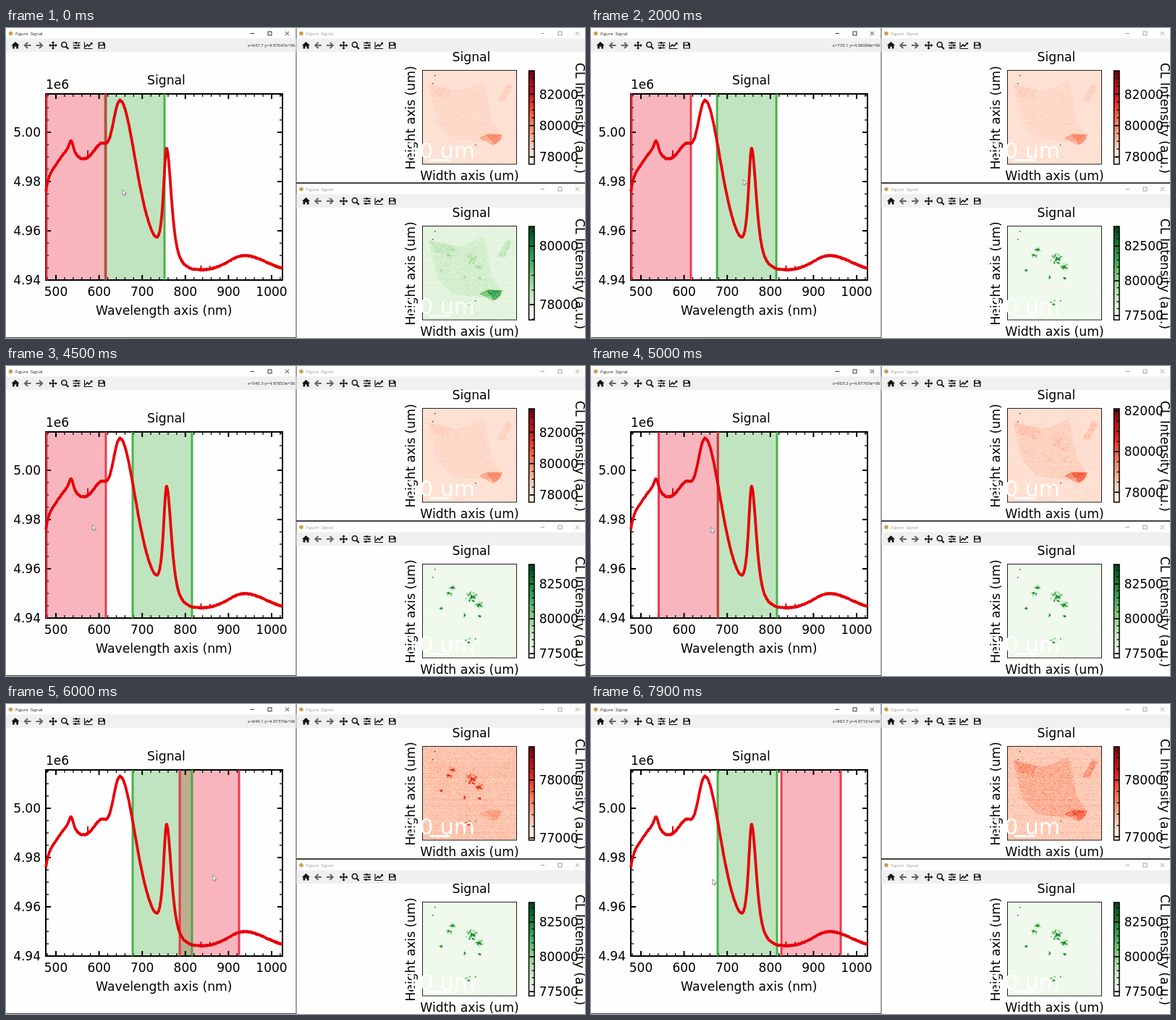
These frames come from a looping animation (800 by 428 pixels, 8000 ms). An HTML page with a canvas:

```html
<!DOCTYPE html>
<html lang="en">
<head>
<meta charset="utf-8">
<title>Spectrum explorer</title>
<style>
html, body { margin: 0; width: 100%; height: 100%; overflow: hidden; background: #fffefe; }
canvas { display: block; width: 800px; height: 428px; }
</style>
</head>
<body>
<canvas id="stage" width="800" height="428"></canvas>
<script>
const LOOP = 8000, STEP = 100, LAG = 400;
const ctx = document.getElementById('stage').getContext('2d');
const PLOT_FONT = '"DejaVu Sans", sans-serif', UI_FONT = '"Open Sans", sans-serif';
const AX = { l: 55, t: 91, r: 382, b: 348 };
const SPAN = 82, IMG_W = 130, IMG_H = 129;
const REDS = 'fff5f0 fee0d2 fcbba1 fc9272 fb6a4a ef3b2c cb181d a50f15 67000d';
const GREENS = 'f7fcf5 e5f5e0 c7e9c0 a1d99b 74c476 41ab5d 238b45 006d2c 00441b';

// Pointer turning points: time, x, y. Spans and readout follow it LAG ms later.
const POINTER = [
  [-400, 157, 224], [0, 161, 223], [600, 172, 210], [1700, 210, 209], [3000, 210, 209], [3600, 93, 217],
  [4100, 93, 217], [5100, 168, 223], [5800, 304, 236], [6700, 159, 239], [7450, 304, 240.5], [7950, 164, 242]
];
// Map look by span position: x, base, flake, patch, spots, noise, low, high
const LOOKS = [
  [55, .12, .03, .27, 0, .025, 77540, 83500],
  [134, .13, .07, .5, .15, .05, 77480, 80620],
  [174, .05, 0, 0, .7, .015, 77190, 83900],
  [239, .22, .01, .12, .45, .09, 76960, 78575],
  [262, .2, .09, .28, 0, .09, 76940, 78590]
];
// Emission peaks: centre, height, left width, right width
const PEAKS = [
  [85, 32, 27, 27], [90, 16, 5.5, 5.5], [158, 240, 30, 43.5], [222, 152, 8, 12], [330, 28, 49, 66]
];

function seeded(s) {
  return () => (s = (s * 16807) % 2147483647) / 2147483647;
}
// Smooth interpolation between key rows
function sample(keys, t) {
  if (t <= keys[0][0]) return keys[0].slice(1);
  const i = keys.findIndex(k => k[0] > t);
  if (i < 0) return keys[keys.length - 1].slice(1);
  const a = keys[i - 1], b = keys[i], u = (t - a[0]) / (b[0] - a[0]);
  return a.slice(1).map((v, j) => v + (b[j + 1] - v) * u * u * (3 - 2 * u));
}
const nmToX = nm => 69 + (nm - 500) * .596;
const xToNm = x => 500 + (x - 69) / .596;
const valToY = v => 348 - (v - 4.94) * 3400;
const yToVal = y => 4.94 + (348 - y) / 3400;

function rect(x, y, w, h, color) {
  ctx.fillStyle = color;
  ctx.fillRect(x, y, w, h);
}
function box(x, y, w, h, color, width) {
  ctx.strokeStyle = color;
  ctx.lineWidth = width;
  ctx.strokeRect(x, y, w, h);
}
function line(pts, color = '#000', width = 1) {
  ctx.beginPath();
  for (let i = 0; i < pts.length; i += 2) ctx.lineTo(pts[i], pts[i + 1]);
  ctx.strokeStyle = color;
  ctx.lineWidth = width;
  ctx.stroke();
}
function shape(c, pts, color) {
  c.beginPath();
  for (let i = 0; i < pts.length; i += 2) c.lineTo(pts[i], pts[i + 1]);
  c.closePath();
  c.fillStyle = color;
  c.fill();
}
function disc(c, x, y, r, color) {
  c.beginPath();
  c.arc(x, y, r, 0, 7);
  c.fillStyle = color;
  c.fill();
}
function text(s, x, y, { size = 17, align = 'center', color = '#000', font = PLOT_FONT, turn = 0 } = {}) {
  ctx.save();
  ctx.translate(x, y);
  ctx.rotate(turn * Math.PI / 2);
  ctx.font = size + 'px ' + font;
  ctx.textAlign = align;
  ctx.fillStyle = color;
  ctx.fillText(s, 0, 0);
  ctx.restore();
}

function palette(hexes) {
  const stops = hexes.split(' ').map(h => [0, 2, 4].map(i => parseInt(h.substr(i, 2), 16)));
  return v => {
    const p = Math.max(0, Math.min(.999, v)) * 8, i = Math.floor(p);
    return stops[i].map((c, j) => c + (stops[i + 1][j] - c) * (p - i));
  };
}
const reds = palette(REDS), greens = palette(GREENS);

// Sample map: flake, patch and spots live in the three colour channels.
function makeMask() {
  const c = new OffscreenCanvas(IMG_W, IMG_H).getContext('2d');
  const rnd = seeded(41);
  c.fillStyle = '#000';
  c.fillRect(0, 0, IMG_W, IMG_H);
  c.globalCompositeOperation = 'lighter';
  shape(c, [7, 18, 50, 28, 84, 14, 96, 70, 109, 88, 85, 98, 40, 93, 20, 72], '#800000');
  shape(c, [10, 20, 40, 27, 36, 38, 17, 36], '#600000');
  shape(c, [103, 42, 117, 17, 124, 22, 112, 43], '#e00000');
  shape(c, [78, 93, 88, 87, 110, 88, 107, 96, 97, 103], '#009000');
  shape(c, [88, 88, 110, 88, 107, 96, 99, 103], '#006000');
  const clusters = [[67, 45, 9], [40, 32, 5], [36, 40, 4], [25, 61, 3], [78, 56, 6], [78, 71, 3], [58, 70, 3], [64, 106, 6]];
  for (const [x, y, r] of clusters) {
    for (let i = 0; i < r * r * .8; i++) {
      const a = rnd() * 6.283, d = r * rnd();
      disc(c, x + d * Math.cos(a), y + d * Math.sin(a) * .85, .6 + rnd(), 'rgba(0,0,255,.4)');
    }
  }
  return c.getImageData(0, 0, IMG_W, IMG_H).data;
}
const mask = makeMask();
const rnd = seeded(97);
const grain = Array.from({ length: IMG_W * IMG_H }, () => rnd() + rnd() - 1);
const rows = Array.from({ length: IMG_H }, () => rnd() - .5);
const tile = new OffscreenCanvas(IMG_W, IMG_H).getContext('2d');
const pixels = tile.createImageData(IMG_W, IMG_H);

function drawMap(x, y, [base, flake, patch, spots, noise], colors) {
  const ramp = Array.from({ length: 256 }, (_, i) => colors(i / 255));
  for (let i = 0; i < grain.length; i++) {
    const g = grain[i], k = i * 4;
    const v = base + flake * mask[k] / 128 * (1 + g * .5) + patch * mask[k + 1] / 255 * (1 + g * .3)
      + spots * mask[k + 2] / 255 + noise * (g + rows[Math.floor(i / IMG_W)] * .5);
    const rgb = ramp[Math.max(0, Math.min(255, Math.round(v * 255)))];
    for (let j = 0; j < 3; j++) pixels.data[k + j] = rgb[j];
    pixels.data[k + 3] = 255;
  }
  tile.putImageData(pixels, 0, 0);
  ctx.drawImage(tile.canvas, x, y);
  for (const [dx, dy] of [[13, 17], [16, 6], [72, 102]]) rect(x + dx, y + dy, 1.4, 1.4, '#333');
}

function drawBar(x, y, lo, hi, colors) {
  const w = 7.5, grad = ctx.createLinearGradient(0, y + IMG_H, 0, y);
  for (let i = 0; i <= 8; i++) grad.addColorStop(i / 8, `rgb(${colors(i / 8).map(Math.round)})`);
  rect(x, y, w, IMG_H, grad);
  const range = hi - lo, major = range < 2000 ? 1000 : range < 6200 ? 2000 : 2500;
  const minor = major === 1000 ? 200 : 500;
  for (let v = Math.ceil(lo / minor) * minor; v <= hi; v += minor) {
    const py = y + IMG_H * (hi - v) / range, big = v % major === 0;
    line([x + w, py, x + (big ? 1 : 4), py], '#000', big ? 1.8 : 1.3);
    if (big) text(v, x + 14.2, py + 6.2, { align: 'left' });
  }
  box(x, y, w, IMG_H, '#000', 1.5);
}

function drawIcons(x, y) {
  const dark = '#151515', gray = '#666';
  ctx.save();
  ctx.translate(x, y);
  // home
  shape(ctx, [7.5, 0, 13, -5, 18.5, 0], dark);
  rect(9, 0, 2.8, 4.5, dark);
  rect(14.2, 0, 2.8, 4.5, dark);
  rect(11, 0, 4, 1.5, dark);
  // back, forward
  for (const [cx, d] of [[30, -1], [46, 1]]) {
    line([cx - 4.5 * d, 0, cx + 4 * d, 0], gray, 2);
    line([cx, -4, cx + 4.2 * d, 0, cx, 4], gray, 2);
  }
  // pan
  line([60, 0, 70, 0], dark, 1.6);
  line([65, -5, 65, 5], dark, 1.6);
  for (const [dx, dy] of [[1, 0], [-1, 0], [0, 1], [0, -1]]) {
    const px = 65 + dx * 3.4, py = dy * 3.4;
    shape(ctx, [px + dx * 2.4, py + dy * 2.4, px + dy * 2.3, py + dx * 2.3, px - dy * 2.3, py - dx * 2.3], dark);
  }
  // zoom
  disc(ctx, 80.3, -1, 4.3, dark);
  disc(ctx, 80.3, -1, 2.7, '#f0f0f0');
  line([83, 1.7, 86.3, 5], dark, 2);
  // sliders
  [4, 7, 3].forEach((k, i) => {
    const dy = (i - 1) * 3.5;
    line([92.5, dy, 102.5, dy], dark, 1.3);
    rect(92 + k, dy - 1.5, 2, 3, dark);
  });
  // chart
  line([108.5, -4.5, 108.5, 4.5, 119.5, 4.5], dark, 1.2);
  line([109.5, 2, 112.5, -1, 114.5, 1, 118.5, -3], dark, 1.6);
  shape(ctx, [116, -4, 119.5, -4, 119.5, -.8], dark);
  // save
  shape(ctx, [127.5, -4.5, 135, -4.5, 137, -2.5, 137, 4.5, 127.5, 4.5], dark);
  rect(129.3, -3.5, 4.6, 2.6, '#f0f0f0');
  rect(129, .5, 6.5, 3, '#f0f0f0');
  ctx.restore();
}

function drawWindow(x, y, w, h, active) {
  const color = active ? '#222' : '#999';
  rect(x, y, w, h, '#fffefe');
  rect(x, y + 14.5, w, 18.5, '#f0f0f0');
  disc(ctx, x + 6.5, y + 7.5, 2.8, '#c9a24e');
  text('Figure  Signal', x + 13, y + 9.7, { size: 6.1, align: 'left', color, font: UI_FONT });
  const b = x + w - (active ? 60 : 58.5), m = y + 7.5;
  line([b - 3, m, b + 2.5, m], color, .9);
  box(b + 21.5, m - 2.5, 5, 5, color, .9);
  for (const d of [-2.5, 2.5]) line([b + 45.5, m - d, b + 50.5, m + d], color, .9);
  drawIcons(x, y + 24);
}

function drawMapWindow(y, left, colors) {
  const look = sample(LOOKS, left), size = 17.2;
  drawWindow(401.5, y, 398.5, 213, false);
  drawMap(576, y + 59, look, colors);
  box(575.5, y + 58.5, IMG_W, IMG_H + .5, '#222', 1);
  drawBar(722.5, y + 59, look[5], look[6], colors);
  text('Signal', 643, y + 46.3, { size });
  text('Width axis (um)', 640.5, y + 210, { size });
  text('Height axis (um)', 565, y + 124, { size, turn: -1 });
  text('CL Intensity (a.u.)', 787, y + 124.5, { size, turn: 1 });
  text('10 um', 648, y + 179.5, { size: 30, align: 'right', color: '#fff' });
  rect(585, y + 181, 29, 3, '#fff');
}

function drawEdges(left, color) {
  for (const x of [left, left + SPAN]) line([x, AX.t, x, AX.b], color, 3);
}

function drawTicks() {
  for (let nm = 480; nm <= 1020; nm += 20) {
    const x = nmToX(nm), big = nm % 100 === 0, n = big ? 7 : 4;
    line([x, AX.b, x, AX.b - n], '#000', big ? 2 : 1.3);
    line([x, AX.t, x, AX.t + n], '#000', big ? 2 : 1.3);
    if (big) text(nm, x, 370);
  }
  for (let i = 0; i <= 15; i++) {
    const v = 4.94 + i * .005, y = valToY(v), big = i % 4 === 0, n = big ? 7 : 4;
    line([AX.l, y, AX.l + n, y], '#000', big ? 2 : 1.3);
    line([AX.r, y, AX.r - n, y], '#000', big ? 2 : 1.3);
    if (big) text(v.toFixed(2), 48, y + 6.2, { align: 'right' });
  }
}

// Plateau with a rising edge and a step down, plus the peaks
function emission(x) {
  let h = 5 + 135 / (1 + Math.exp((x - 138) / 5)) - 26 * Math.exp((AX.l - x) / 4);
  for (const [c, height, wl, wr] of PEAKS) h += height / (1 + ((x - c) / (x < c ? wl : wr)) ** 2) ** 2;
  return h;
}
function makeSpectrum() {
  const out = [], jitter = seeded(7);
  for (let x = AX.l; x <= AX.r; x += .5) out.push(x, AX.b - emission(x) + (jitter() - .5) * 1.2);
  return out;
}
const spectrum = makeSpectrum();

function drawSpectrum(redLeft, greenLeft, nm, val) {
  const size = 17.2, ink = '#e6000a', h = AX.b - AX.t;
  drawWindow(0, 0, 400.5, 427, true);
  text(`x=${nm.toFixed(1)} y=${val.toFixed(5)}e+06`, 399.5, 26.2, { size: 6, align: 'right', color: '#222', font: UI_FONT });
  text('Signal', 221.5, 77.5, { size });
  text('1e6', 55, 84, { align: 'left' });
  text('Wavelength axis (nm)', 218.3, 395.5, { size });
  rect(redLeft, AX.t, SPAN, h, '#f9b5bd');
  rect(greenLeft, AX.t, SPAN, h, 'rgba(7,147,0,.25)');
  box(AX.l, AX.t, AX.r - AX.l, h, '#000', 2);
  drawTicks();
  drawEdges(greenLeft, 'rgba(55,168,55,.88)');
  drawEdges(redLeft, 'rgba(232,35,58,.86)');
  ctx.lineJoin = 'round';
  line(spectrum, ink, 3.8);
  ctx.lineJoin = 'miter';
  for (const [x, n] of [[113, 10], [269.5, 6], [282, 4]]) {
    const y = AX.b - emission(x);
    line([x, y, x, y - n], ink, 2);
  }
}

function drawPointer(x, y) {
  const pts = [0, 0, 0, 7.6, 1.8, 6, 3, 8.6, 4.2, 8, 3.1, 5.5, 5.4, 5.4].map((v, i) => v + (i % 2 ? y : x));
  shape(ctx, pts, '#fff');
  line(pts.concat(pts.slice(0, 2)), '#777', .8);
}

let last = -1;
function draw(now) {
  const t = Math.floor(now % LOOP / STEP) * STEP;
  if (t !== last) {
    last = t;
    const follow = time => sample(POINTER, time - LAG);
    const [x, y] = follow(t);
    // Green is dragged first, then red.
    const greenLeft = follow(Math.max(1000, Math.min(t, 3400)))[0] - 35;
    const redLeft = follow(Math.max(4000, t))[0] - 37;
    rect(0, 0, 800, 428, '#444');
    drawSpectrum(redLeft, greenLeft, xToNm(x), yToVal(y));
    drawMapWindow(0, redLeft, reds);
    drawMapWindow(215, greenLeft, greens);
    drawPointer(...sample(POINTER, t));
  }
  requestAnimationFrame(draw);
}
requestAnimationFrame(draw);
</script>
</body>
</html>
```
